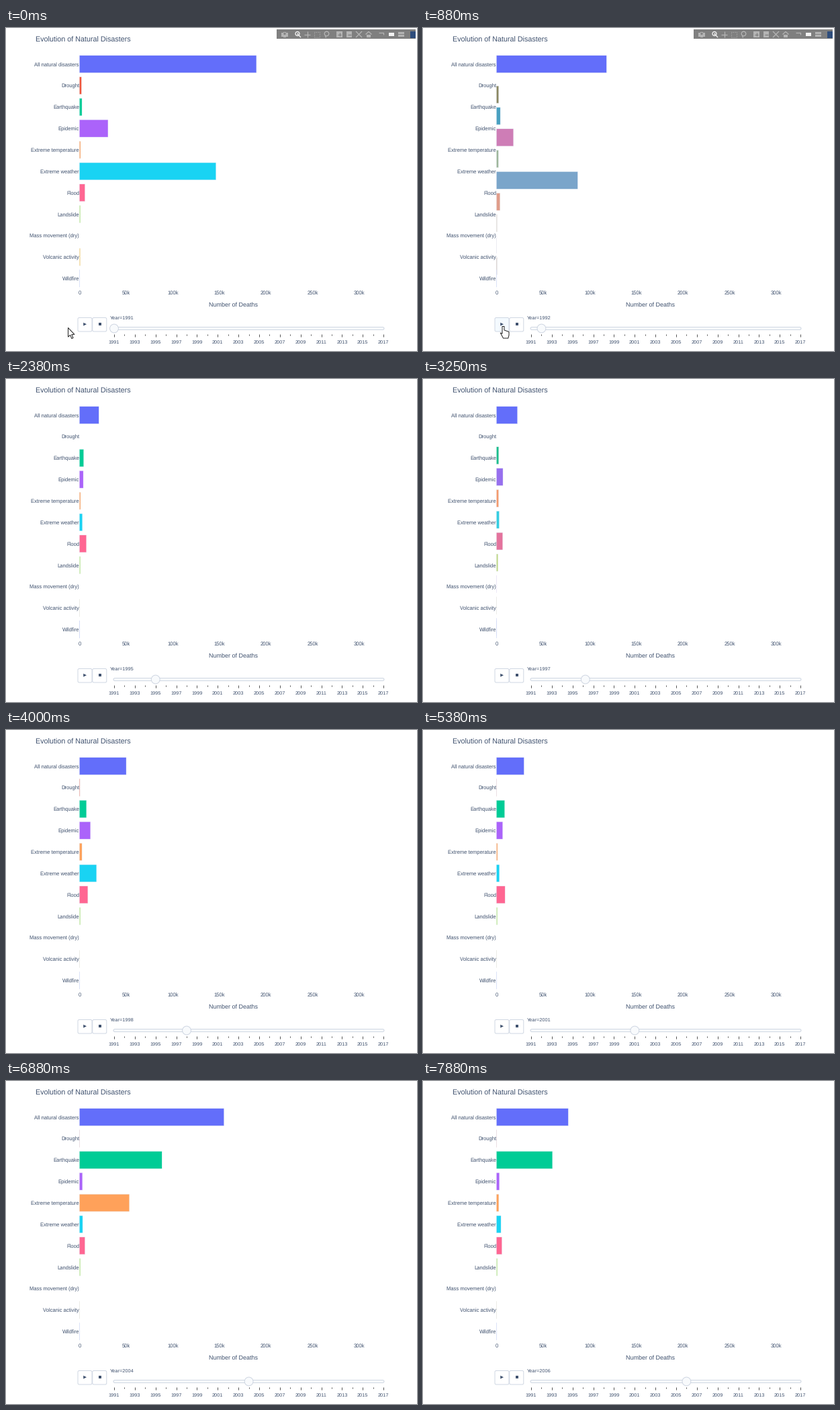
A matplotlib script that plays this animation: 612x480 px, repeating every 8000 ms.

```python
import matplotlib.pyplot as plt
import numpy as np
from matplotlib.animation import FuncAnimation
from matplotlib.colors import to_rgb
from matplotlib.patches import Circle, FancyBboxPatch, Polygon, Rectangle

W, H, DPI = 612, 480, 100
FRAMES, STEP = 64, 125
HELD = (13, 50)                      # steps on which the picture stands still
PX = 72 / DPI
INK, BORDER, PALE = "#40526f", "#cbd3e0", "#f8fafc"
PALETTE = ["#636efa", "#ef553b", "#00cc96", "#ab63fa", "#ffa15a",
           "#19d3f3", "#ff6692", "#b6e880", "#ff97ff", "#fecb52"]

# Thousands of deaths per category: a usual level, then bell-shaped peaks
# given as (year, height) or (year, height, width)
SERIES = {
    "Drought": (.1, (1991, 1.9), (1997, .6)),
    "Earthquake": (2.5, (1993, 7.5), (1995, 4.7), (1998, 8), (1999, 19.4),
                   (2001, 18.8), (2003, 27), (2004, 228.5), (2005, 78)),
    "Epidemic": (3, (1991, 27.5, .67), (1998, 9.3, 2.3)),
    "Extreme temperature": (1, (1998, 2.5), (2002, 2), (2003, 73.7),
                            (2006, 5)),
    "Extreme weather": (3, (1991, 143.3), (1998, 25), (1999, 9),
                        (2005, 2, 1)),
    "Flood": (5.7, (1995, 2, 1.5), (1999, 29, .75)),
    "Landslide": (.9,),
    "Mass movement (dry)": (0,),
    "Volcanic activity": (.1, (1991, .6)),
    "Wildfire": (.1,),
}
LABELS = ["All natural disasters", *SERIES]
FIRST = 1991
NO_DROUGHT = range(1992, 1997)       # years whose bars all move up one slot

PLAY, YEAR_MS, MORPH_MS, SLIDE_MS = 664, 505.5, 500, 150
X0, PER_K, Y0, ROW, BAR = 109.4, 1.388, 53.7, 31.85, 25.7
RAIL_X, RAIL_Y, YEAR_PX = 161, 446.5, 15.43

plt.rcParams["font.family"] = "Liberation Sans"
plt.rcParams["text.hinting"] = "none"
fig = plt.figure(figsize=(W / DPI, H / DPI), dpi=DPI, facecolor="white")
ax = fig.add_axes([0, 0, 1, 1])
ax.set(xlim=(0, W), ylim=(H, 0))
ax.axis("off")


def text(x, y, s, size=7.6, ha="center"):
    return ax.text(x, y, s, fontsize=size * PX, color=INK, ha=ha,
                   va="center_baseline")


def add(patch):
    return ax.add_patch(patch)


def box(x, y, w, h, r, fc):
    return add(FancyBboxPatch((x, y), w, h, fc=fc, ec=BORDER, lw=.9 * PX,
                              boxstyle=f"round,pad=0,rounding_size={r}"))


def line(xs, ys, color, width=1, **kw):
    return ax.plot(xs, ys, color=color, lw=width * PX,
                   solid_capstyle="butt", **kw)[0]


def cubic_in_out(t):
    return 4 * t ** 3 if t < .5 else 1 - 4 * (1 - t) ** 3


# Chart
text(44, 16.8, "Evolution of Natural Disasters", 10.8, "left")
text(339, 410.5, "Number of Deaths", 9.06)
for k in range(0, 301, 50):
    text(X0 + k * PER_K, 393, f"{k}k" if k else "0", 7.6)
for row, label in enumerate(LABELS):
    text(109, Y0 + row * ROW, label, ha="right")
bars = [add(Rectangle((X0, 0), 0, BAR, ec="#e5ecf6", lw=.35 * PX,
                      snap=False)) for _ in LABELS]

# Buttons and slider
play = box(107, 430.5, 21, 20.5, 2, "white")
box(128.8, 430.5, 21, 20.5, 2, "white")
add(Polygon([(115.2, 437.8), (115.2, 442.6), (120, 440.2)], fc=INK))
add(Rectangle((137.5, 437.8), 4.2, 4.4, fc=INK))
year_text = text(155, 430.8, "", 7.4, "left")
box(160, 444.6, 403, 3.8, 1.9, PALE)
for n in range(27):
    x = RAIL_X + n * YEAR_PX
    line([x, x], [455, 457 if n % 2 else 459.3], "#444444", .9)
    if n % 2 == 0:
        text(x, 466, str(FIRST + n), 7.4)
handle = add(Circle((RAIL_X, RAIL_Y), 6.4, fc=PALE, ec=BORDER, lw=.9 * PX,
                    zorder=4))


def toolbar():
    dim, lit, back, cy = "#b4b4b4", "#f2f2f2", "#7f7f7f", 9.5
    parts = [add(Rectangle((403, 2), 207, 14, fc=back, zorder=5))]

    def block(x, w, h, color=dim, dy=0, **kw):
        style = dict(fc=color, lw=0, zorder=6) | kw
        parts.append(add(Rectangle((x - w / 2, cy + dy - h / 2), w, h,
                                   **style)))

    def ring(x, r, color):
        parts.append(add(Circle((x, cy - 1), r, fc="none", ec=color,
                                lw=1.3 * PX, zorder=7)))

    def stroke(x, dx, dy, color=dim):
        parts.append(line(x + np.array(dx), cy + np.array(dy), color, 1.3,
                          zorder=7))

    def plus(x, r, color, dy=0):
        stroke(x, [-r, r], [dy, dy], color)
        stroke(x, [0, 0], [dy - r, dy + r], color)

    # Icons stand in groups, evenly spaced within each
    spots, x = [], 415
    for size in (1, 4, 4, 3, 1):
        spots += [x + 14.5 * i for i in range(size)]
        x = spots[-1] + 19
    (camera, zoom, pan, select, lasso, grow, shrink, fit, home, spike,
     closest, compare, badge) = spots

    block(camera, 9.5, 6.5, dy=.5)
    block(camera, 4, 8)
    ring(camera, 1, back)
    ring(zoom, 3, lit)
    plus(zoom, 1.4, lit, -1)
    stroke(zoom, [2, 5], [1.2, 4.5], lit)
    plus(pan, 4.5, dim)
    block(select, 8.5, 8, fc="none", ec=dim, lw=PX, ls=":")
    ring(lasso, 3.3, dim)
    stroke(lasso, [-2, -1], [2, 5])
    for spot in (grow, shrink):
        block(spot, 8.5, 8.5)
    plus(grow, 2.5, back)
    stroke(shrink, [-2.5, 2.5], [0, 0], back)
    for end in (4.5, -4.5):
        stroke(fit, [-4.5, 4.5], [-end, end])
    block(home, 6, 4, dy=2)
    stroke(home, [-4.5, 0, 4.5], [0, -4, 0])
    stroke(spike, [-4, 3, 3], [-3, -3, 0])
    block(closest, 8, 5, lit)
    for dy in (-2.3, 2.3):
        block(compare, 9, 2.8, dy=dy)
    block(badge - 1, 7.5, 10, "#2f4d7c")
    return parts


tools = toolbar()

# Pointers, relative to their tip
ARROW = np.array([(0, 0), (0, 13.5), (3.1, 10.8), (5.4, 16), (7.5, 15),
                  (5.3, 10), (9.4, 9.8)])
HAND = np.array([(-1, 0), (2, 0), (2, 5.5), (9, 8), (9, 13), (7.8, 17.5),
                 (.5, 17.5), (-3.7, 9.6), (-1, 10.6)])
pointer = add(Polygon(ARROW, fc="white", ec="#222222", lw=PX, zorder=9,
                      joinstyle="round"))


def deaths(name, year):
    level, *peaks = SERIES[name]
    for centre, height, *width in peaks:
        spread = width[0] if width else .4
        level += height * np.exp(-((year - centre) / spread) ** 2)
    return 0 if name == "Drought" and year in NO_DROUGHT else level


def traces(year):
    """Row, value and colour of each bar slot in a year."""
    values = [deaths(name, year) for name in SERIES]
    values.insert(0, sum(values))
    slots = list(range(len(LABELS)))
    if year in NO_DROUGHT:
        slots = [0, *slots[2:], slots[-1]]
    return [(s, values[s], np.array(to_rgb(PALETTE[s % len(PALETTE)])))
            for s in slots]


def draw_pointer(t):
    u = cubic_in_out(np.clip((t - 60) / 440, 0, 1))
    tip = np.array([92.5 + 26.5 * u, 445.5 - 2 * u])
    shown = t < 1250
    over = shown and tip[0] > 107
    pointer.set_xy(tip + (HAND if over else ARROW))
    pointer.set_visible(shown)
    play.set_facecolor("#f4faff" if over else "white")


def update(i):
    t = STEP * (i - (i in HELD))
    n = int(max(0, np.floor((t - PLAY) / YEAR_MS) + 1))
    since = t - PLAY - (n - 1) * YEAR_MS if n else 0
    year = FIRST + n

    p = min(1, since / MORPH_MS)
    for bar, a, b in zip(bars, traces(max(FIRST, year - 1)), traces(year)):
        row, value, color = (u + (v - u) * p for u, v in zip(a, b))
        bar.set_y(Y0 + row * ROW - BAR / 2)
        bar.set_width(value * PER_K + .2)
        bar.set_facecolor(np.clip(color, 0, 1))
        bar.set_visible(value > .04)

    slide = cubic_in_out(min(1, since / SLIDE_MS))
    handle.center = (RAIL_X + (max(0, n - 1) + slide * (n > 0)) * YEAR_PX,
                     RAIL_Y)
    year_text.set_text(f"Year={year}")

    draw_pointer(t)
    fade = float(np.clip((1500 - t) / 300, 0, 1))
    for part in tools:
        part.set_alpha(fade)
        part.set_visible(fade > 0)
    return []


anim = FuncAnimation(fig, update, frames=FRAMES, interval=STEP,
                     init_func=lambda: update(0), repeat=True,
                     repeat_delay=0, blit=False)
plt.show()
```
